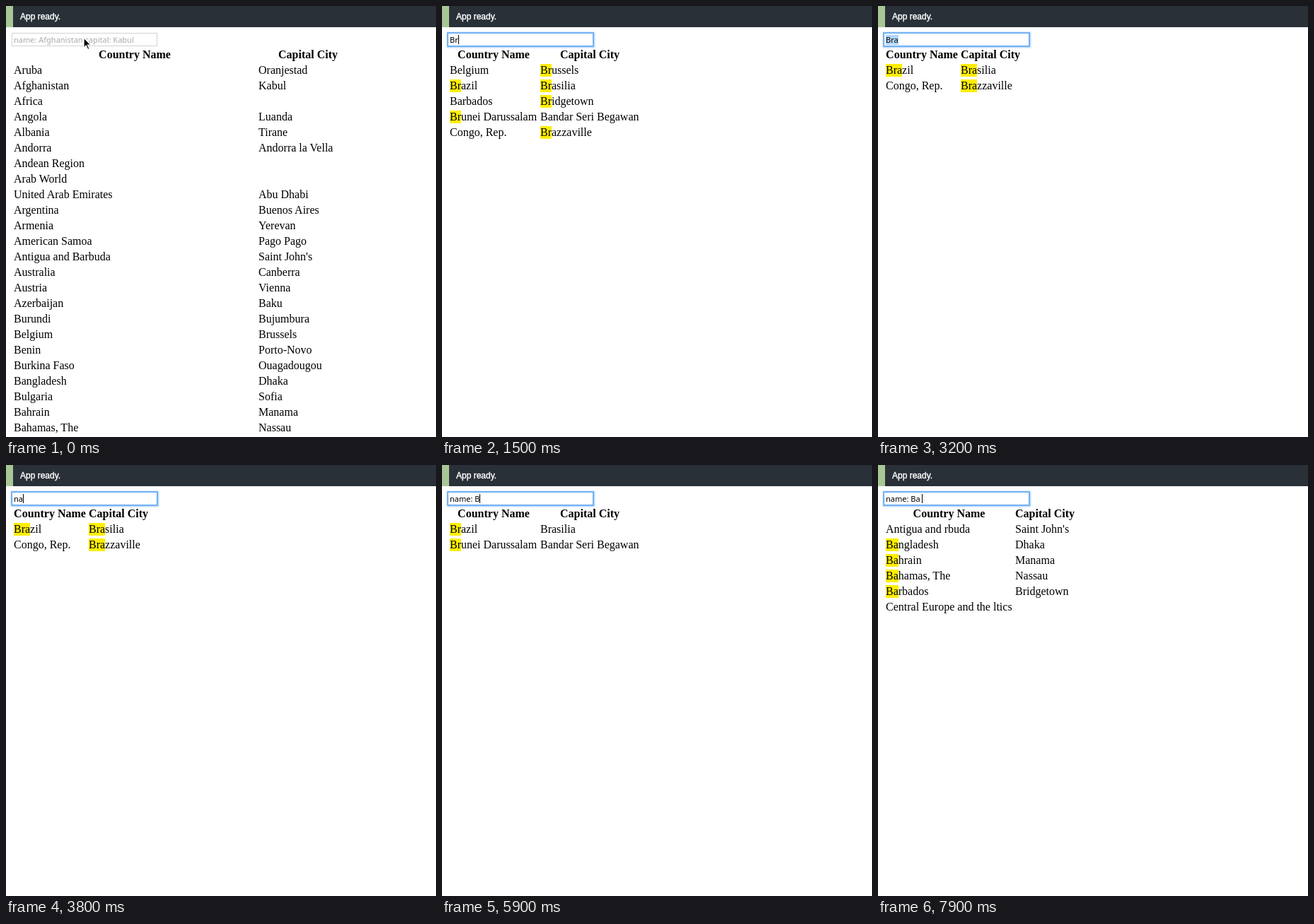
An HTML page for the animation above (8 s loop, 608 px wide and 610 px high).

```html
<!DOCTYPE html>
<html lang="en">
<head>
<meta charset="utf-8">
<title>Country filter</title>
<style>
html, body { margin: 0; width: 100%; height: 100%; overflow: hidden; background: #fff; }
#stage { position: relative; width: 608px; height: 610px; overflow: hidden; }
#bar {
  position: absolute; left: 0; top: 0; width: 588px; height: 30px; padding-left: 10px;
  border-left: 10px solid #a9c796; background: #293038; color: #fff;
  font: 12px/30px "Liberation Sans", Arial, sans-serif; -webkit-text-stroke: .4px #fff;
}
#field {
  position: absolute; left: 8px; top: 38px; width: 206px; height: 19px; box-sizing: border-box;
  border: 1px solid #d2d2d2; padding-left: 2px; background: #fff; color: #000;
  font: 11px/17px "Noto Sans", "Open Sans", sans-serif; white-space: pre;
}
#field.empty { color: #a9a9a9; }
#field.focus { border-color: #64a8f0; box-shadow: 0 0 0 1px #7db8f6, 0 0 2px 1.5px #a5cffb; }
#text { display: inline-block; height: 14px; line-height: 14px; vertical-align: top; margin-top: 2px; }
#text.selected { background: #b3d7fe; }
#caret { display: inline-block; width: 1px; height: 13px; margin-top: 2px; vertical-align: top; background: #000; }
table {
  position: absolute; left: 8px; top: 57px; table-layout: fixed; border-spacing: 2px;
  font: 16px/18px "Liberation Serif", Times, serif; color: #000;
}
th, td { height: 18px; padding: 1px; white-space: nowrap; overflow: visible; vertical-align: top; }
td { text-align: left; }
mark { display: inline-block; height: 18px; background: #ffee00; color: #000; vertical-align: top; }
#mouse { position: absolute; left: 107px; top: 42px; }
</style>
</head>
<body>
<div id="stage">
  <div id="bar">App ready.</div>
  <table id="table"></table>
  <div id="field"><span id="text"></span><span id="caret"></span></div>
  <svg id="mouse" width="16" height="22">
    <path d="M3 3v14l3.2-3 2.5 5.6 2.2-1-2.5-5.4h4.5z" stroke="#fff" stroke-width="1.2"/>
  </svg>
</div>
<script>
const LOOP = 8000;
const $ = id => document.getElementById(id);

const countries = `Aruba|Oranjestad;Afghanistan|Kabul;Africa|;Angola|Luanda;Albania|Tirane;
Andorra|Andorra la Vella;Andean Region|;Arab World|;United Arab Emirates|Abu Dhabi;
Argentina|Buenos Aires;Armenia|Yerevan;American Samoa|Pago Pago;
Antigua and Barbuda|Saint John's;Australia|Canberra;Austria|Vienna;Azerbaijan|Baku;
Burundi|Bujumbura;Belgium|Brussels;Benin|Porto-Novo;Burkina Faso|Ouagadougou;
Bangladesh|Dhaka;Bulgaria|Sofia;Bahrain|Manama;Bahamas, The|Nassau;
Bosnia and Herzegovina|Sarajevo;Belarus|Minsk;Belize|Belmopan;Bermuda|Hamilton;
Bolivia|La Paz;Brazil|Brasilia;Barbados|Bridgetown;Brunei Darussalam|Bandar Seri Begawan;
Bhutan|Thimphu;Botswana|Gaborone;Central Europe and the Baltics|;Congo, Rep.|Brazzaville`
  .split(";").map(row => row.trim().split("|"));

// [time, field text]
const edits = [
  [0, ""], [900, "B"], [1200, "Br"], [2000, "Bra"],
  [3700, "n"], [3800, "na"], [3900, "nam"], [4000, "name"], [4100, "name:"],
  [4300, "name: "], [4500, "name: B"], [4800, "name: Br"],
  [5700, "name: B"], [6500, "name: Ba"], [7500, "name: Ba "]
];
// [time, query, names only, column widths]
const views = [
  [0, "", false, 344, 142], [1400, "Br", false, 126, 142], [2300, "Bra", false, 104, 86],
  [4200, "", false, 344, 142], [5100, "Br", true, 126, 142],
  [6100, "B", true, 188, 142], [6800, "Ba", true, 181, 86]
];
const FOCUS = 300, SELECT = [3000, 3700], TYPING = 900;

const latest = (list, t) => list.filter(item => item[0] <= t).pop();

// A match at the start is marked; a later match is dropped from the text.
function highlight(text, query) {
  if (!query || !text.includes(query)) return text;
  const rest = text.replace(query, "");
  return text.startsWith(query) ? `<mark>${query}</mark>${rest}` : rest;
}

function showTable([, query, namesOnly, w1, w2]) {
  const rows = countries
    .filter(([name, capital]) => name.includes(query) || !namesOnly && capital.includes(query))
    .map(([name, capital]) =>
      `<tr><td>${highlight(name, query)}<td>${namesOnly ? capital : highlight(capital, query)}`);
  $("table").style.width = w1 + w2 + 6 + "px";
  $("table").innerHTML = `<colgroup><col style="width:${w1}px"><col style="width:${w2}px"></colgroup>
    <tr><th>Country Name<th>Capital City` + rows.join("");
}

let shown;
function draw(now) {
  const t = now % LOOP;
  const view = latest(views, t);
  if (view !== shown) showTable(shown = view);

  const [since, value] = latest(edits, t);
  const focused = t >= FOCUS;
  const selected = t >= SELECT[0] && t < SELECT[1];
  const blinkOn = (t - since) % 1000 < 500;
  $("text").textContent = value || "name: Afghanistan capital: Kabul";
  $("text").className = selected ? "selected" : "";
  $("field").className = (value ? "" : "empty ") + (focused ? "focus" : "");
  $("caret").style.visibility = value && !selected && blinkOn ? "visible" : "hidden";
  $("mouse").style.display = t < TYPING ? "block" : "none";
  requestAnimationFrame(draw);
}
draw(performance.now());
</script>
</body>
</html>
```
